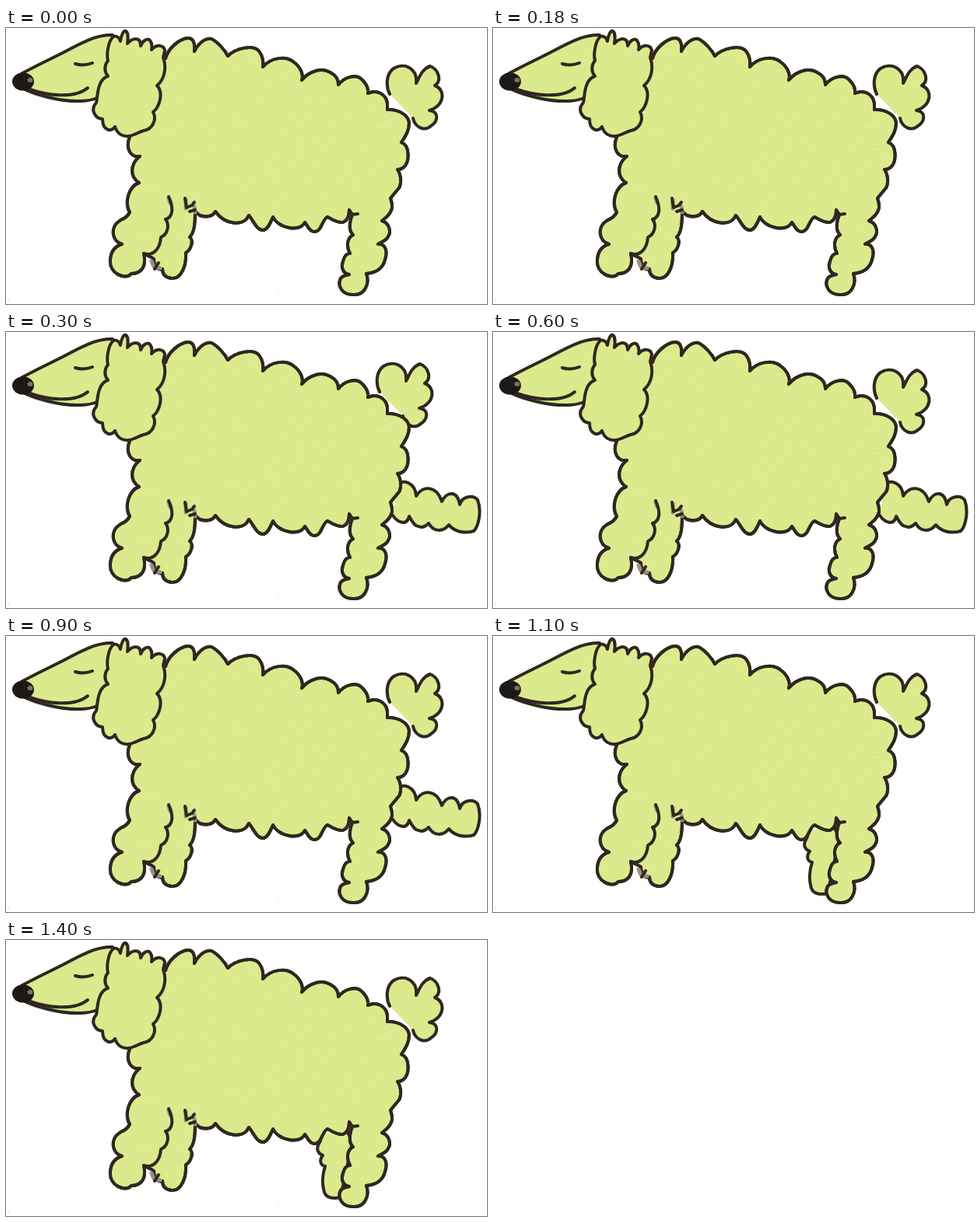
Write an HTML page that moves like this. It is 618 by 355 pixels and loops after 1.6 s.

```html
<!DOCTYPE html>
<html lang="en">
<head>
<meta charset="utf-8">
<title>Poodle</title>
<style>
  html, body { margin: 0; width: 100%; height: 100%; overflow: hidden; background: #fff; }
  svg { display: block; width: 100%; height: 100%; }
  path { stroke-linecap: round; stroke-linejoin: round; }
  .shape { fill: #dbea8d; stroke: #30271f; stroke-width: 4; }
  .line { fill: none; stroke: #30271f; stroke-width: 4; }
  .smudge { fill: none; stroke: #998f80; stroke-width: 5; }
  .fleck { fill: none; stroke-width: 1.5; }
</style>
</head>
<body>
<svg id="stage" viewBox="0 0 618 355"></svg>
<script>
const stage = document.getElementById('stage');
const DURATION = 1600;

// Each pose lasts until the next start time.
const POSES = [
  { start: 0,    tail: 'low',  leg: 'none' },
  { start: 300,  tail: 'high', leg: 'raised' },
  { start: 600,  tail: 'low',  leg: 'raised' },
  { start: 1100, tail: 'low',  leg: 'down' },
];

function add(tag, attrs, parent = stage) {
  const el = document.createElementNS('http://www.w3.org/2000/svg', tag);
  for (const key in attrs) el.setAttribute(key, attrs[key]);
  return parent.appendChild(el);
}
const draw = (cls, d) => add('path', { class: cls, d });

function play(el, styleOf) {
  const frames = POSES.map(pose => ({
    ...styleOf(pose), offset: pose.start / DURATION, easing: 'step-end',
  }));
  frames.push({ ...styleOf(POSES[POSES.length - 1]), offset: 1 });
  el.animate(frames, { duration: DURATION, iterations: Infinity });
}

// The silhouette runs clockwise from behind the ear.
const back = `M205 39C208 26 224 13 234 13C241 13 243 20 242 30
  C247 20 256 12 264 14C272 18 281 28 285 36C295 26 319 20 326 31
  C330 37 331 43 330 50C340 38 360 35 370 44C378 50 383 60 380 67
  C390 55 406 50 418 58C426 62 427 68 427 73C435 63 450 58 458 67
  C463 72 466 78 465 84C476 79 488 84 490 97L490 105`;
const rump = `C504 104 517 112 518 122C518 132 514 138 508 147
  C519 151 518 170 513 177C510 181 506 182 503 182
  C509 191 508 204 503 208L494 219C498 230 496 236 489 243L483 248`;
const hindLeg = `C493 251 495 263 491 268C489 274 482 275 478 278
  C489 277 490 289 487 298C484 310 474 315 463 316
  C468 330 460 343 448 343C432 344 425 332 430 322C433 318 437 318 441 317
  C433 316 430 308 433 300C435 292 438 290 442 290
  C437 281 438 270 446 266C440 261 441 250 445 240L441 234`;
const belly = `C441 242 438 248 433 250C426 251 419 246 413 243
  C406 246 406 262 396 262C390 262 388 255 384 250
  C378 263 350 258 343 243C340 250 336 260 330 260
  C322 260 318 248 312 241C305 257 280 252 269 236
  C265 244 255 243 249 241L243 236`;
const frontLegs = `C243 252 242 263 236 269C242 274 237 286 231 289
  C232 306 225 323 213 322C204 321 201 316 201 310
  C195 312 190 305 190 297C186 294 181 293 177 290
  C181 308 173 316 161 316C154 325 132 316 134 298
  C135 285 142 280 149 278C135 274 134 255 146 248
  C150 245 155 245 159 237C152 225 157 204 171 199
  C159 192 159 175 172 165C160 167 153 155 159 140`;
const body = back + rump + hindLeg + belly + frontLegs;

const earTop = `M117 90C118 80 120 65 131 62C126 56 126 48 131 42
  C129 34 131 17 138 11C142 9 146 13 147 17C148 9 151 3 154 4
  C157 6 157 14 156 20C162 13 173 10 173 23C175 17 182 12 185 16
  C188 20 188 24 187 28C194 20 203 22 204 29L202 38`;
const earBottom = `C206 49 205 65 194 74C203 83 197 102 189 108
  C194 117 189 130 177 132C170 134 165 138 158 139
  C151 140 143 137 140 127C136 134 124 133 124 117
  C116 117 107 106 116 96L117 90`;

const tail = draw('shape', `M493 85C488 75 488 59 498 52C511 44 529 51 527 71
  C531 64 534 53 545 49C555 53 561 67 551 74C565 79 564 100 544 106
  C558 108 554 121 546 126C537 134 525 127 523 116`);
const raisedLeg = draw('shape', `M503 197C510 188 526 194 527 211
  C535 197 553 197 560 218C566 205 580 203 583 222C586 211 600 209 606 216
  C611 229 608 249 601 256C588 260 575 256 569 248C561 258 549 257 543 246
  C539 250 534 252 530 250C526 250 521 243 518 237
  C515 250 503 245 497 236`);
const downLeg = draw('shape', `M405 250C404 256 405 258 402 262
  C398 269 401 275 407 277C402 283 404 290 410 291C407 300 406 312 408 320
  C409 330 416 334 430 331L445 260L438 245`);

draw('shape', `M137 9C121 8 106 15 90 23C66 36 35 50 16 61L24 79
  C43 88 75 95 95 94C105 94 112 92 117 90L145 70Z`);
draw('line', 'M31 79C50 86 88 92 105 77');
draw('line', 'M89 46C95 48 103 48 111 45');
add('ellipse', { cx: 22, cy: 69, rx: 14, ry: 11.5, fill: '#1d1916' });
add('ellipse', { cx: 31, cy: 67, rx: 3.5, ry: 3, fill: '#79746c' });

draw('smudge', 'M209 217L212 229');
draw('shape', body);

const clip = add('clipPath', { id: 'coat' }, add('defs', {}));
add('path', { d: body }, clip);
const coat = add('g', { 'clip-path': 'url(#coat)' });

let seed = 17;
function random() {
  seed = (seed * 16807) % 2147483647;
  return seed / 2147483647;
}
function flecks(count, colour) {
  let d = '';
  for (let i = 0; i < count; i++) {
    const x = 145 + random() * 365, y = 30 + random() * 290;
    d += `M${x.toFixed(1)} ${y.toFixed(1)}l${(2 + random() * 4).toFixed(1)} 1.5`;
  }
  add('path', { class: 'fleck', d, stroke: colour }, coat);
}
flecks(180, '#e1ee9c');
flecks(100, '#d6e585');
draw('line', body);

draw('smudge', 'M209 219L211 225M231 221L231 232M242 230L243 237M187 300L190 307L198 309');
draw('line', `M209 217C216 232 214 244 205 246C211 254 207 266 199 269
  C198 285 188 294 177 290`);
draw('line', 'M230 219L232 231L239 228L242 224M236 236L243 234');
draw('line', 'M445 240L452 239M196 302L191 310');
draw('shape', earTop + earBottom);

add('circle', { cx: 3, cy: 349, r: 1.2, fill: '#eeee9a' });
add('circle', { cx: 351, cy: 342, r: 1, fill: '#f0f0ac' });

play(tail, pose => ({
  transform: pose.tail === 'high' ? 'translate(-13px, -8px)' : 'translate(0px, 0px)',
}));
for (const [name, el] of [['raised', raisedLeg], ['down', downLeg]]) {
  play(el, pose => ({ visibility: pose.leg === name ? 'visible' : 'hidden' }));
}
</script>
</body>
</html>
```
